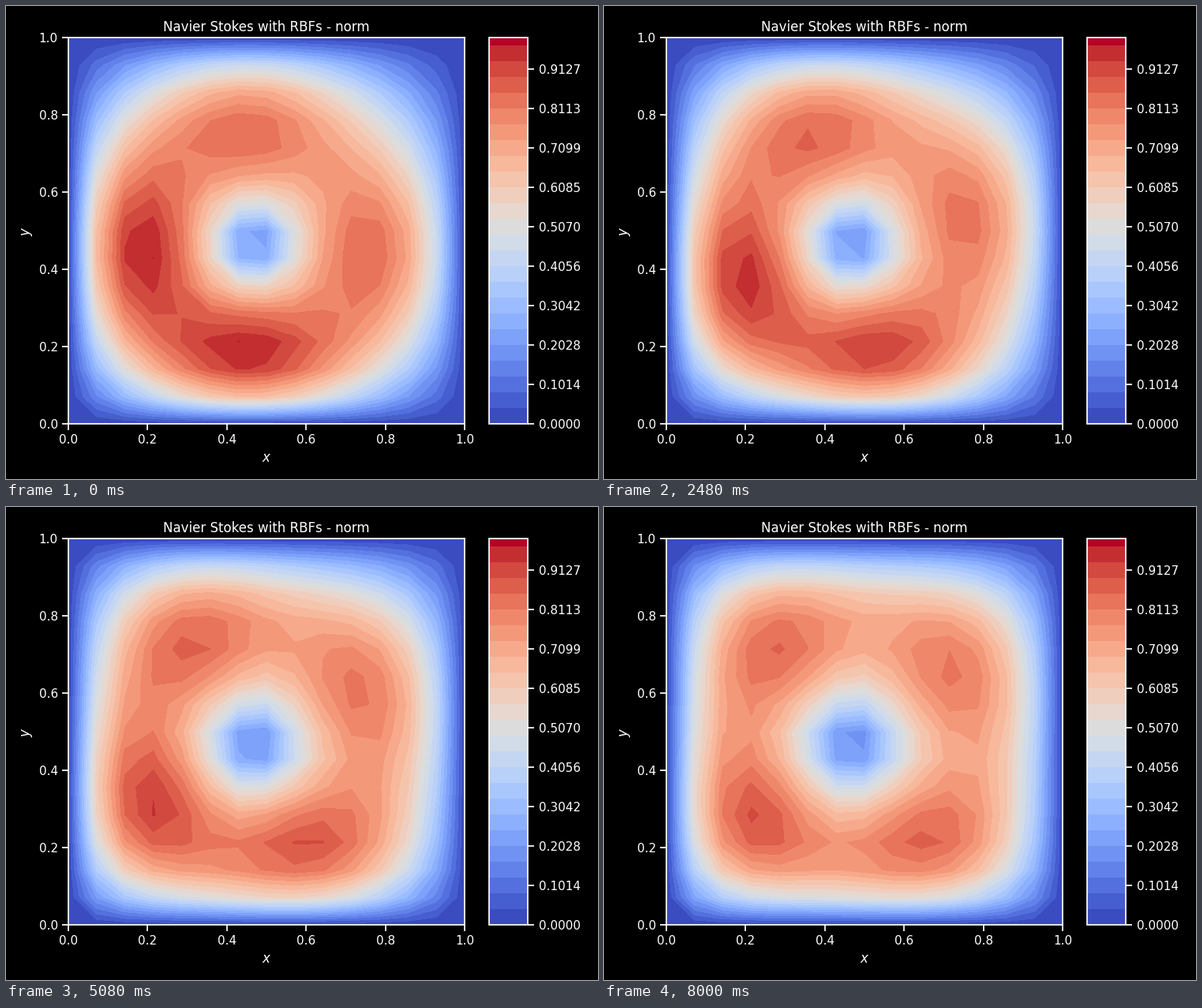
Recreate the animation shown at these times as a matplotlib script. Size 750x600 px, loop 8040 ms.

```python
import numpy as np
import matplotlib.pyplot as plt
from matplotlib.animation import FuncAnimation
from matplotlib.cm import ScalarMappable
from matplotlib.colors import BoundaryNorm, ListedColormap

FRAMES, INTERVAL = 201, 40
BANDS, V_MAX = 49, 0.99381
TURN = np.radians(36)

plt.style.use("dark_background")
plt.rcParams.update({
    "font.family": "DejaVu Sans", "font.size": 12,
    "axes.linewidth": 1.25, "axes.labelsize": 12, "axes.titlesize": 12,
})
for axis in ("xtick", "ytick"):
    plt.rcParams.update({f"{axis}.labelsize": 11, f"{axis}.major.size": 6,
                         f"{axis}.major.width": 1.25})

# Box coordinates with the vortex centre at 0 and the walls at -1 and 1
nodes = np.linspace(0, 1, 15)
s = 2 * nodes - 1
X, Y = np.meshgrid(*[s + 0.065 * (1 - s**2)] * 2)
r = np.hypot(X, Y)
theta = np.arctan2(Y, X)
# Squared distance that is round near the centre and square at the walls
square = 1 - (1 - X**2) * (1 - Y**2)


def mix(a, b, p):
    return a + (b - a) * p


def speed(p):
    """Vortex with four lobes that turns, widens and evens out, 0 <= p <= 1."""
    turn = TURN * (1 - (1 - p) ** 1.4)
    core = 1.17 * np.tanh(mix(2.45, 1.97, p) * r)
    walls = (1 - square**2) * (1 - mix(0.5, 0, p) * (X * Y) ** 2)
    lobes = 0.88 + 0.1 * r * (1 + np.cos(4 * (theta - turn)))
    tilt = 1 - mix(0.12, 0.05, p) * (X + Y)
    return np.clip(core * walls * lobes * tilt, 0, V_MAX * 0.9999)


# Neighbouring bands share a tone
tones = plt.get_cmap("coolwarm")(np.linspace(0, 1, (BANDS + 1) // 2))
cmap = ListedColormap(np.repeat(tones, 2, axis=0)[:BANDS])
levels = np.linspace(0, V_MAX, BANDS + 1)
norm = BoundaryNorm(levels, BANDS)

fig, ax = plt.subplots(figsize=(7.5, 6), dpi=100)
ax.set(xlim=(0, 1), ylim=(0, 1), xlabel="$x$", ylabel="$y$",
       title="Navier Stokes with RBFs - norm")
bar = fig.colorbar(ScalarMappable(norm, cmap), ax=ax, aspect=10,
                   ticks=levels[::5], format="%.4f")
bar.minorticks_off()
fig.tight_layout()
filled = None


def update(i):
    global filled
    if filled is not None:
        filled.remove()
    filled = ax.contourf(nodes, nodes, speed(i / (FRAMES - 1)),
                         levels=levels, cmap=cmap, norm=norm)
    return [filled]


anim = FuncAnimation(fig, update, frames=FRAMES, interval=INTERVAL,
                     init_func=lambda: [], repeat=True, repeat_delay=0)
plt.show()
```
